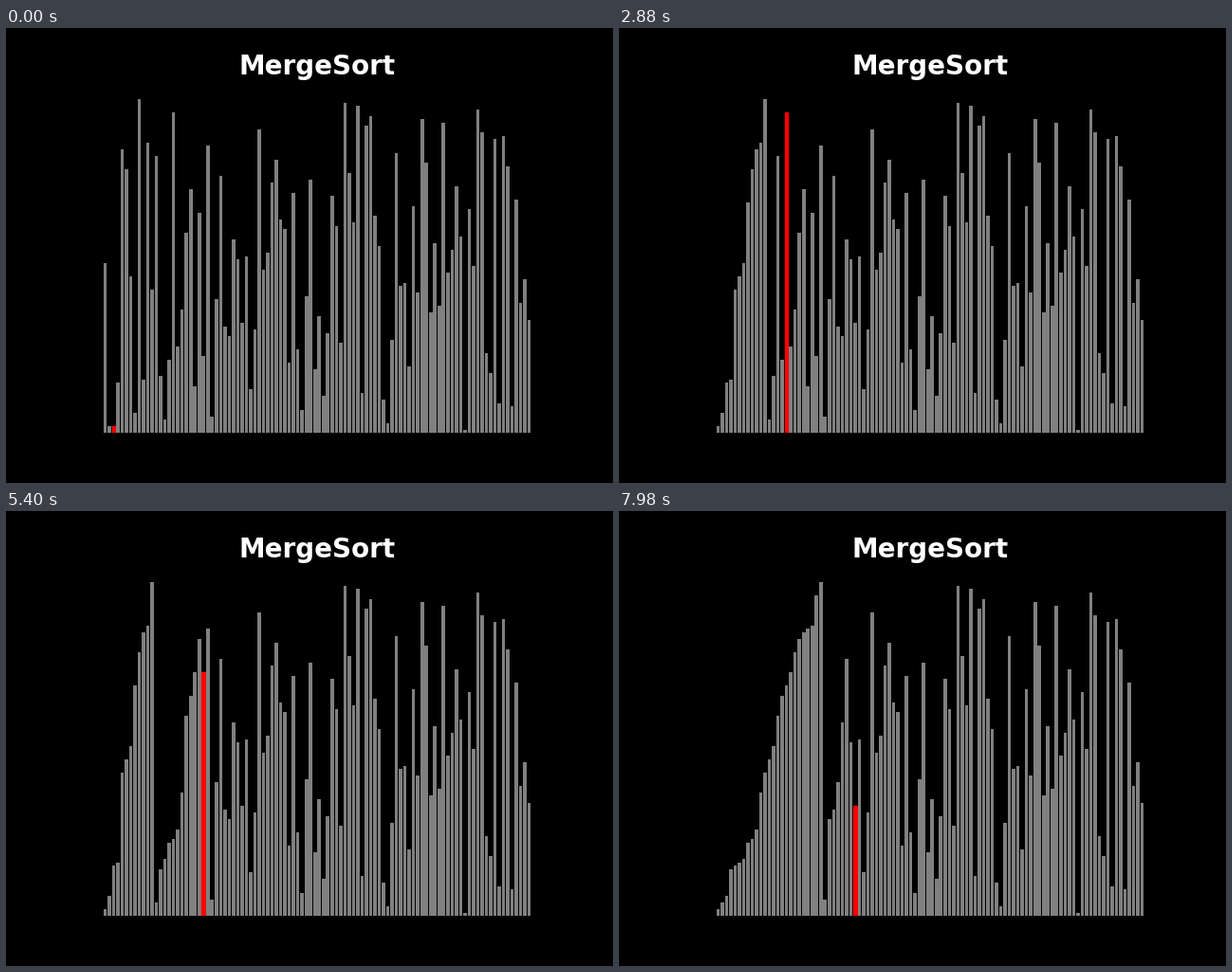
Write a matplotlib script that moves like this. It is 640 by 480 pixels and loops after 8000 ms.

```python
from itertools import islice

import matplotlib.pyplot as plt
from matplotlib.animation import FuncAnimation

STEPS = 134      # sorting steps in one loop
HOLD = 3         # ticks each step stays on screen
TICKS = 400      # ticks of 20 ms in one loop

VALUES = [
    51, 69, 2, 15, 85, 79, 47, 6, 100, 16, 87, 43, 83, 17, 4, 22, 96, 26, 37, 60,
    73, 14, 66, 23, 86, 5, 40, 77, 32, 29, 58, 52, 33, 53, 13, 31, 91, 49, 54, 75,
    82, 64, 61, 21, 72, 25, 7, 41, 76, 19, 35, 11, 30, 71, 62, 27, 99, 78, 63, 98,
    12, 92, 95, 65, 56, 10, 3, 28, 84, 44, 45, 20, 68, 42, 94, 81, 36, 57, 38, 93,
    48, 55, 74, 59, 1, 67, 50, 97, 90, 24, 18, 88, 9, 89, 80, 8, 70, 39, 46, 34,
]


def merge_sort(a, lo, hi):
    """Sort a[lo:hi], yielding a snapshot and the slot about to be written."""
    if hi - lo < 2:
        return
    mid = (lo + hi) // 2
    yield from merge_sort(a, lo, mid)
    yield from merge_sort(a, mid, hi)
    left, right = a[lo:mid], a[mid:hi]
    for k in range(lo, hi):
        yield a[:], k
        from_left = left and (not right or left[0] <= right[0])
        a[k] = (left if from_left else right).pop(0)


# The loop opens on the second write of the first merge.
states = list(islice(merge_sort(VALUES[:], 0, len(VALUES)), 1, 1 + STEPS))

fig, ax = plt.subplots(figsize=(6.4, 4.8), dpi=100, facecolor="black")
bars = ax.bar(range(len(VALUES)), VALUES, color="gray")
ax.set_ylim(0, 105)
ax.set_title("MergeSort", fontsize=20, fontweight="bold", color="white",
             fontfamily="DejaVu Sans")
ax.axis("off")


def draw(tick):
    heights, active = states[tick // HOLD]
    for i, (bar, height) in enumerate(zip(bars, heights)):
        bar.set_height(height)
        bar.set_facecolor("red" if i == active else "gray")
        bar.set_edgecolor("red" if i == active else "none")
    return bars.patches


anim = FuncAnimation(fig, draw, frames=TICKS, interval=20, repeat=True,
                     repeat_delay=0, blit=False)
plt.show()
```
